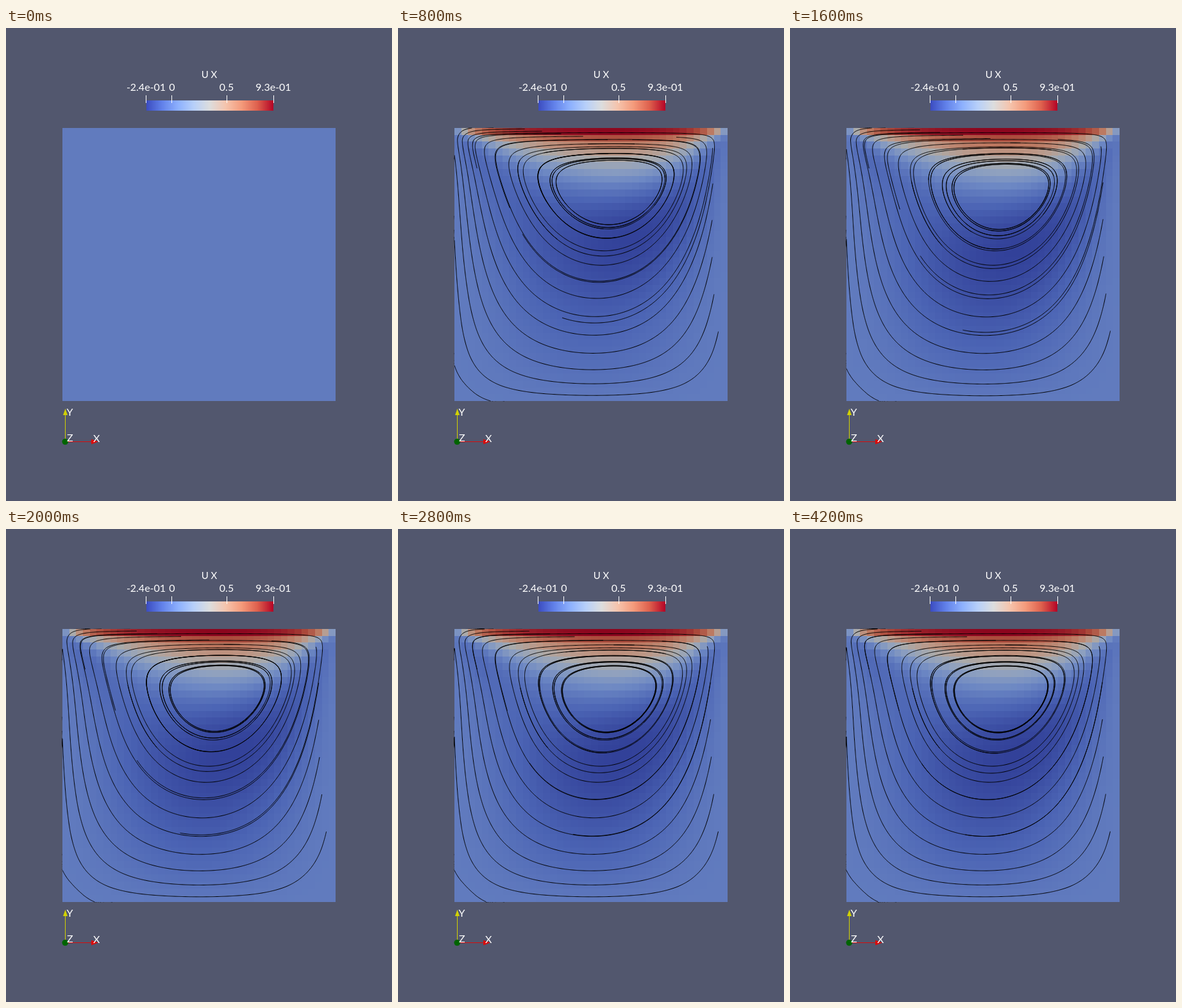
Animation, 602 px wide and 738 px high, one loop 4400 ms. Source, as an HTML page with a canvas:

```html
<!DOCTYPE html>
<html lang="en">
<head>
<meta charset="utf-8">
<title>Lid-driven cavity</title>
<style>
  html, body { margin: 0; width: 100%; height: 100%; overflow: hidden; background: #52576e; }
  canvas, svg { position: absolute; left: 0; top: 0; width: 602px; height: 738px; }
  text { font-family: Lato, "Open Sans", sans-serif; font-size: 16px; fill: #fff; }
  .mid { text-anchor: middle; }
  .small { font-size: 15px; }
</style>
</head>
<body>
<canvas id="view" width="602" height="738"></canvas>
<svg viewBox="0 0 602 738">
  <text class="mid small" x="317" y="78">U X</text>
  <g class="mid">
    <text x="218.5" y="98">-2.4e-01</text>
    <text x="259" y="98">0</text>
    <text x="344" y="98">0.5</text>
    <text x="417" y="98">9.3e-01</text>
  </g>
  <path d="M218.5 105v12M258.5 105v12M344.5 105v12M417.5 105v12" stroke="#fff"/>
  <path d="M92.5 645V603" stroke="#d2d200"/>
  <path d="M92.5 594l3.5 10h-7z" fill="#d2d200"/>
  <path d="M93 645.5h41" stroke="#d80c0c"/>
  <path d="M144 645.5l-11 -4v8z" fill="#d80c0c"/>
  <circle cx="92.3" cy="645.5" r="4.8" fill="#006400"/>
  <g class="small">
    <text x="94.5" y="605">Y</text>
    <text x="136" y="646">X</text>
    <text x="95" y="645">Z</text>
  </g>
</svg>
<script>
const N = 40, M = N + 1, H = 1 / N;
const NU = 1 / 50, DT = 0.0035, STEPS = 100, SWEEPS = 12, RELAX = 1.85;
const FRAMES = 22, HOLD = 200, SEEDS = 20;
const LEFT = 88, TOP = 156, SIZE = 426, CELL = SIZE / N;
const LOW = -0.24, HIGH = 0.93, SHADE = 0.77;
const COOLWARM = [
  [59, 76, 192], [98, 130, 234], [141, 176, 254], [184, 208, 249], [221, 221, 221],
  [245, 196, 173], [244, 154, 123], [222, 96, 77], [180, 4, 38]
];

const ctx = document.getElementById('view').getContext('2d');
const psi = new Float64Array(M * M);
let vort = new Float64Array(M * M), next = new Float64Array(M * M);

function color(value, shade) {
  const s = Math.min(1, Math.max(0, (value - LOW) / (HIGH - LOW))) * 8;
  const i = Math.min(7, Math.floor(s));
  const mix = COOLWARM[i].map((c, k) => Math.round((c + (COOLWARM[i + 1][k] - c) * (s - i)) * shade));
  return `rgb(${mix})`;
}

// Vorticity / stream function solver; row 0 is the floor, the lid moves at speed 1.
function advance() {
  const wall = -2 / (H * H);
  for (let i = 0; i < M; i++) {
    vort[i] = wall * psi[i + M];
    vort[N * M + i] = wall * (psi[(N - 1) * M + i] + H);
    vort[i * M] = wall * psi[i * M + 1];
    if (i < N) vort[i * M + N] = wall * psi[i * M + N - 1];
  }
  next.set(vort);
  for (let j = 1; j < N; j++) for (let i = 1; i < N; i++) {
    const p = j * M + i;
    const u = (psi[p + M] - psi[p - M]) / (2 * H), v = (psi[p - 1] - psi[p + 1]) / (2 * H);
    const flow = (u * (vort[p + 1] - vort[p - 1]) + v * (vort[p + M] - vort[p - M])) / (2 * H);
    const spread = (vort[p + 1] + vort[p - 1] + vort[p + M] + vort[p - M] - 4 * vort[p]) / (H * H);
    next[p] = vort[p] + DT * (NU * spread - flow);
  }
  [vort, next] = [next, vort];
  for (let k = 0; k < SWEEPS; k++)
    for (let j = 1; j < N; j++) for (let i = 1; i < N; i++) {
      const p = j * M + i;
      const goal = (psi[p + 1] + psi[p - 1] + psi[p + M] + psi[p - M] + H * H * vort[p]) / 4;
      psi[p] += RELAX * (goal - psi[p]);
    }
}

function cellVelocities() {
  const u = new Float64Array(N * N), v = new Float64Array(N * N);
  for (let j = 0; j < N; j++) for (let i = 0; i < N; i++) {
    const p = j * M + i, a = psi[p], b = psi[p + 1], c = psi[p + M], d = psi[p + M + 1];
    u[j * N + i] = (c + d - a - b) / (2 * H);
    v[j * N + i] = (a + c - b - d) / (2 * H);
  }
  return { u, v };
}

// Mean of the cells that touch each grid point
function toPoints(cells) {
  const out = new Float64Array(M * M);
  for (let j = 0; j < M; j++) for (let i = 0; i < M; i++) {
    let sum = 0, n = 0;
    for (let y = Math.max(0, j - 1); y <= Math.min(N - 1, j); y++)
      for (let x = Math.max(0, i - 1); x <= Math.min(N - 1, i); x++) { sum += cells[y * N + x]; n++; }
    out[j * M + i] = sum / n;
  }
  return out;
}

function sample(field, x, y) {
  const i = Math.min(N - 1, Math.max(0, Math.floor(x))), j = Math.min(N - 1, Math.max(0, Math.floor(y)));
  const fx = x - i, fy = y - j, p = j * M + i;
  return (field[p] * (1 - fx) + field[p + 1] * fx) * (1 - fy)
       + (field[p + M] * (1 - fx) + field[p + M + 1] * fx) * fy;
}

// One streamline of at most the cavity's width, up- or downstream
function trace(path, pu, pv, x, y, sign) {
  const step = 0.1;
  const heading = (x, y) => {
    const u = sample(pu, x, y), v = sample(pv, x, y), s = Math.hypot(u, v);
    return s > 1e-9 ? [sign * u / s, sign * v / s] : [0, 0];
  };
  const put = how => path[how](LEFT + x * CELL, TOP + SIZE - y * CELL);
  put('moveTo');
  for (let done = 0; done < N; done += step) {
    const [ax, ay] = heading(x, y);
    const [bx, by] = heading(x + ax * step / 2, y + ay * step / 2);
    if (!bx && !by) return;
    x += bx * step;
    y += by * step;
    if (x < 0 || y < 0 || x > N || y > N) return;
    put('lineTo');
  }
}

function snapshot(moving) {
  const { u, v } = cellVelocities(), lines = new Path2D();
  if (moving) {
    const pu = toPoints(u), pv = toPoints(v);
    for (let k = 1; k < SEEDS; k++) {
      const at = k * N / SEEDS;
      trace(lines, pu, pv, at, at, 1);
      trace(lines, pu, pv, at, at, -1);
    }
  }
  return { u, lines };
}

const states = [snapshot(false)];
function state(k) {
  while (states.length <= k) {
    for (let s = 0; s < STEPS; s++) advance();
    states.push(snapshot(true));
  }
  return states[k];
}

function draw(k) {
  const { u, lines } = state(k);
  const edge = i => Math.round(i * CELL);
  for (let j = 0; j < N; j++) for (let i = 0; i < N; i++) {
    ctx.fillStyle = color(u[(N - 1 - j) * N + i], SHADE);
    ctx.fillRect(LEFT + edge(i), TOP + edge(j), edge(i + 1) - edge(i), edge(j + 1) - edge(j));
  }
  ctx.strokeStyle = '#000';
  ctx.lineWidth = 1;
  ctx.stroke(lines);
}

for (let x = 0; x < 198; x++) {
  ctx.fillStyle = color(LOW + (HIGH - LOW) * (x + 0.5) / 198, 1);
  ctx.fillRect(219 + x, 113, 1, 16);
}

let shown = -1;
function tick() {
  const k = Math.floor(performance.now() / HOLD) % FRAMES;
  if (k !== shown) draw(shown = k);
  requestAnimationFrame(tick);
}
state(FRAMES - 1);
draw(shown = 0);
requestAnimationFrame(tick);
</script>
</body>
</html>
```
